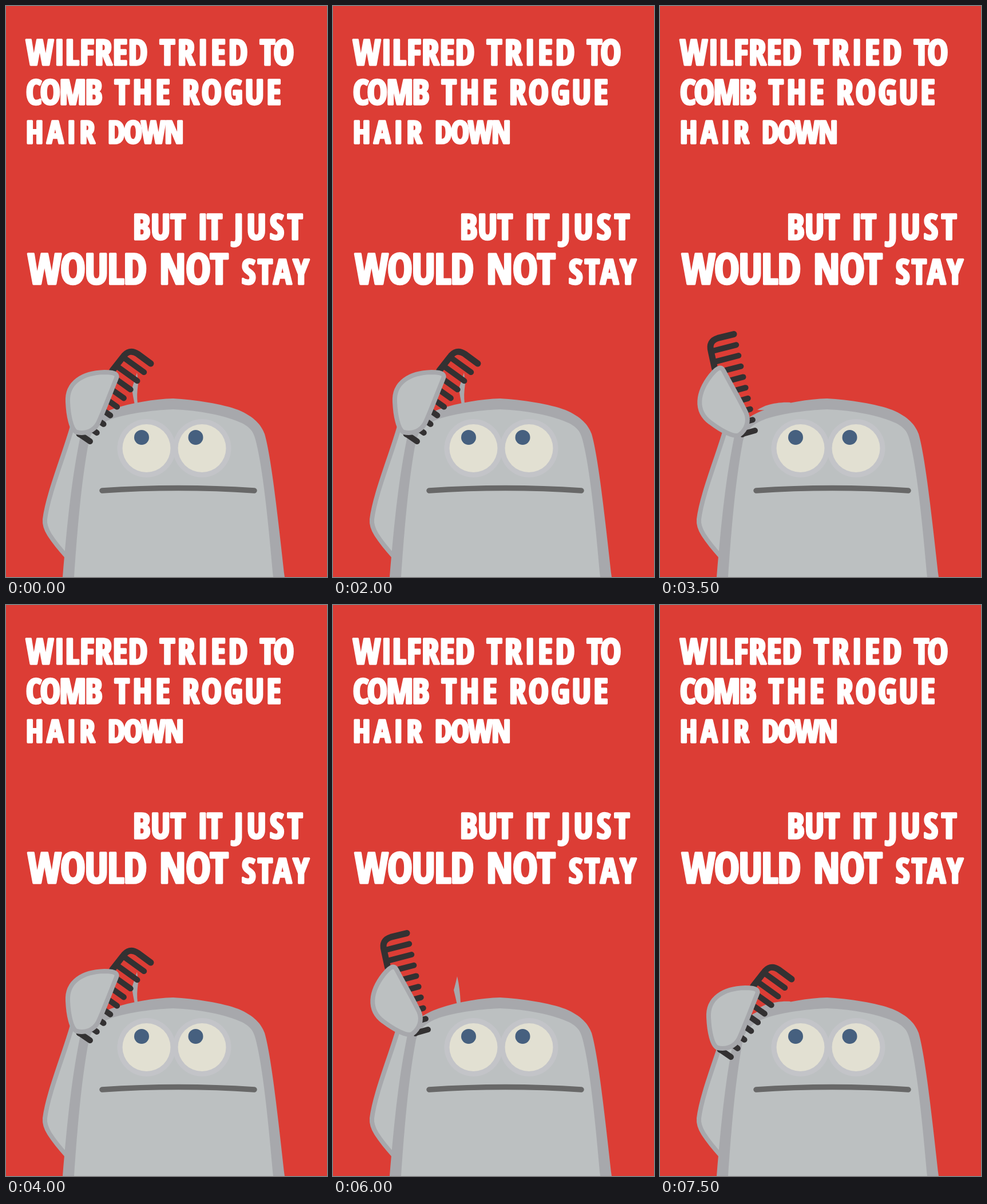
Write an HTML page with a canvas that moves like this. It is 561 px wide and 998 px high and loops after 8 s.

```html
<!DOCTYPE html>
<html lang="en">
<head>
<meta charset="utf-8">
<title>The rogue hair</title>
<style>
  html, body { margin: 0; width: 100%; height: 100%; overflow: hidden; background: #dc3d35; }
  canvas { display: block; }
</style>
</head>
<body>
<canvas id="stage" width="561" height="998"></canvas>
<script>
const ctx = document.getElementById('stage').getContext('2d');
const LOOP = 8000;
const RED = '#dc3d35', EDGE = '#a7a8ac', SKIN = '#bcc0c1', COMB = '#333132';
const FONTS = '"Open Sans Condensed", "Roboto Condensed", "Noto Sans Condensed", "Open Sans", sans-serif';
const OUTLINE = 3.5, WORD_GAP = 21;

const shape = {
  arm: 'M116 735 C100 790 73 855 68 897 C67 908 71 916 76 924 C85 938 95 950 106 962 L140 962 L140 740 Z',
  body: 'M99 998 C108 890 116 820 130 752 C136 728 160 714 185 705 C220 693 260 687 292 686 ' +
    'C330 688 380 696 406 706 C434 718 446 732 452 748 C464 789 476 900 487 998 Z',
  belly: 'M119 998 C125 910 132 830 144 765 C148 740 165 728 190 720 C225 710 265 706 292 705 ' +
    'C340 707 375 715 400 724 C425 733 432 742 436 758 C450 810 460 920 467 998 Z',
  hand: 'M108 692 C106 658 134 641 172 640 C194 640 196 645 192 653 C184 672 172 705 161 729 ' +
    'C153 744 138 748 124 745 C114 742 109 715 108 692 Z',
  spine: 'M128 748 L150 700 L186 637 L204 614 Q215 598 230 608 L253 625',
  mouth: 'M168 847 Q301 838 434 847',
  hairUp: 'M217 649 Q214 663 211 673 Q214 685 217 699 L223 696 Q222 670 217 649 Z',
  hairTilted: 'M229 641 Q224 656 220 669 Q222 683 225 697 L230 694 Q228 680 231 660 Z',
  hairFlat: 'M228 693 C212 692 198 695 190 697 C182 699 175 703 170 706 C188 707 205 706 226 698 Z'
};
for (const key in shape) shape[key] = new Path2D(shape[key]);

// Each pose moves the last comb tooth to (x, y) and turns the hand around it.
const lean = { x: 147, y: 761, turn: 0, hair: 'hairTilted' };
const press = { x: 124, y: 790, turn: 0, hair: 'hairFlat' };
const lift = { x: 166, y: 742, turn: -50.3, hair: 'hairFlat' };
const spring = { ...lift, hair: 'hairUp' };
const schedule = [
  [0, lean], [1000, press], [1500, lift],
  [2000, lean], [3000, press], [3500, lift],
  [4000, lean], [5000, press], [5500, lift],
  [6000, spring], [7000, lean], [7500, press]
];

// Words start at their given x; the last one ends at the right margin of the line.
const lines = [
  { base: 105, cap: 50, right: 502, words: { WILFRED: 33, TRIED: 267, TO: 442 } },
  { base: 174, cap: 50, right: 479, words: { COMB: 33, THE: 188, ROGUE: 306 } },
  { base: 242, cap: 50, right: 309, words: { HAIR: 33, DOWN: 176 } },
  { base: 410, cap: 48, right: 528, words: { BUT: 220, IT: 333, JUST: 397 } },
  { base: 488, cap: 63, right: 387, words: { WOULD: 36, NOT: 266 } },
  { base: 488, cap: 47, right: 528, words: { STAY: 410 } }
];

const mix = (a, b, t) => a + (b - a) * t;
const clamp = (v, lo, hi) => Math.max(lo, Math.min(hi, v));

function fill(path, color) {
  ctx.fillStyle = color;
  ctx.fill(path);
}

function stroke(path, color, width) {
  ctx.strokeStyle = color;
  ctx.lineWidth = width;
  ctx.stroke(path);
}

function disc(x, y, r, color) {
  ctx.fillStyle = color;
  ctx.beginPath();
  ctx.arc(x, y, r, 0, Math.PI * 2);
  ctx.fill();
}

function setFont(size) {
  ctx.font = `bold ${size}px ${FONTS}`;
  if ('fontStretch' in ctx) ctx.fontStretch = 'condensed';
}

// Size comes from the cap height, letter spacing from the room left in the word.
function layoutLine({ base, cap, right, words }) {
  ctx.letterSpacing = '0px';
  setFont(100);
  const em = ctx.measureText('H').actualBoundingBoxAscent / 100;
  const entries = Object.entries(words);
  const placed = entries.map(([text, x], i) => {
    const next = entries[i + 1];
    const end = next ? next[1] - WORD_GAP : right;
    const unit = ctx.measureText(text).width / 100;
    return { text, unit, gaps: text.length - 1, room: end - x, x: x + OUTLINE / 2 };
  });
  const fits = placed.map(w => (w.room + 2 * w.gaps) / w.unit);
  const size = Math.min((cap - OUTLINE) / em, ...fits);
  return placed.map(w => ({
    text: w.text, x: w.x, y: base - OUTLINE / 2, size,
    track: clamp((w.room - w.unit * size) / w.gaps, -2, 6)
  }));
}

function drawText() {
  ctx.fillStyle = ctx.strokeStyle = '#fff';
  ctx.lineWidth = OUTLINE;
  for (const { text, x, y, size, track } of title) {
    setFont(size);
    ctx.letterSpacing = `${track}px`;
    ctx.strokeText(text, x, y);
    ctx.fillText(text, x, y);
  }
}

function drawFace() {
  for (const x of [245.5, 342.5]) {
    disc(x, 773, 51, '#c3c4c8');
    disc(x, 773, 42, '#e2e0d2');
  }
  disc(237, 754, 13, '#46607f');
  disc(331.5, 754, 13, '#46607f');
  stroke(shape.mouth, '#686868', 9.5);
}

function drawComb() {
  stroke(shape.spine, COMB, 11);
  const teeth = new Path2D();
  for (let i = 1; i <= 9; i++) {
    const root = (i - 1) / 8, tip = i / 9;
    teeth.moveTo(mix(205, 128, root), mix(614, 748, root));
    teeth.lineTo(mix(253, 147, tip), mix(625, 761, tip));
  }
  stroke(teeth, COMB, 10);
}

function drawHand(pose) {
  ctx.save();
  ctx.translate(pose.x, pose.y);
  ctx.rotate(pose.turn * Math.PI / 180);
  ctx.translate(-lean.x, -lean.y);
  drawComb();
  fill(shape.hand, SKIN);
  stroke(shape.hand, EDGE, 8);
  ctx.restore();
}

function draw(time) {
  const pose = schedule.findLast(([start]) => start <= time)[1];
  ctx.fillStyle = RED;
  ctx.fillRect(0, 0, 561, 998);
  drawText();
  fill(shape.arm, SKIN);
  stroke(shape.arm, EDGE, 8);
  fill(shape.body, EDGE);
  fill(shape.belly, SKIN);
  fill(shape[pose.hair], EDGE);
  drawFace();
  drawHand(pose);
}

const title = lines.flatMap(layoutLine);
const startTime = performance.now();
function tick() {
  draw((performance.now() - startTime) % LOOP);
  requestAnimationFrame(tick);
}

ctx.lineCap = ctx.lineJoin = 'round';
tick();
</script>
</body>
</html>
```
